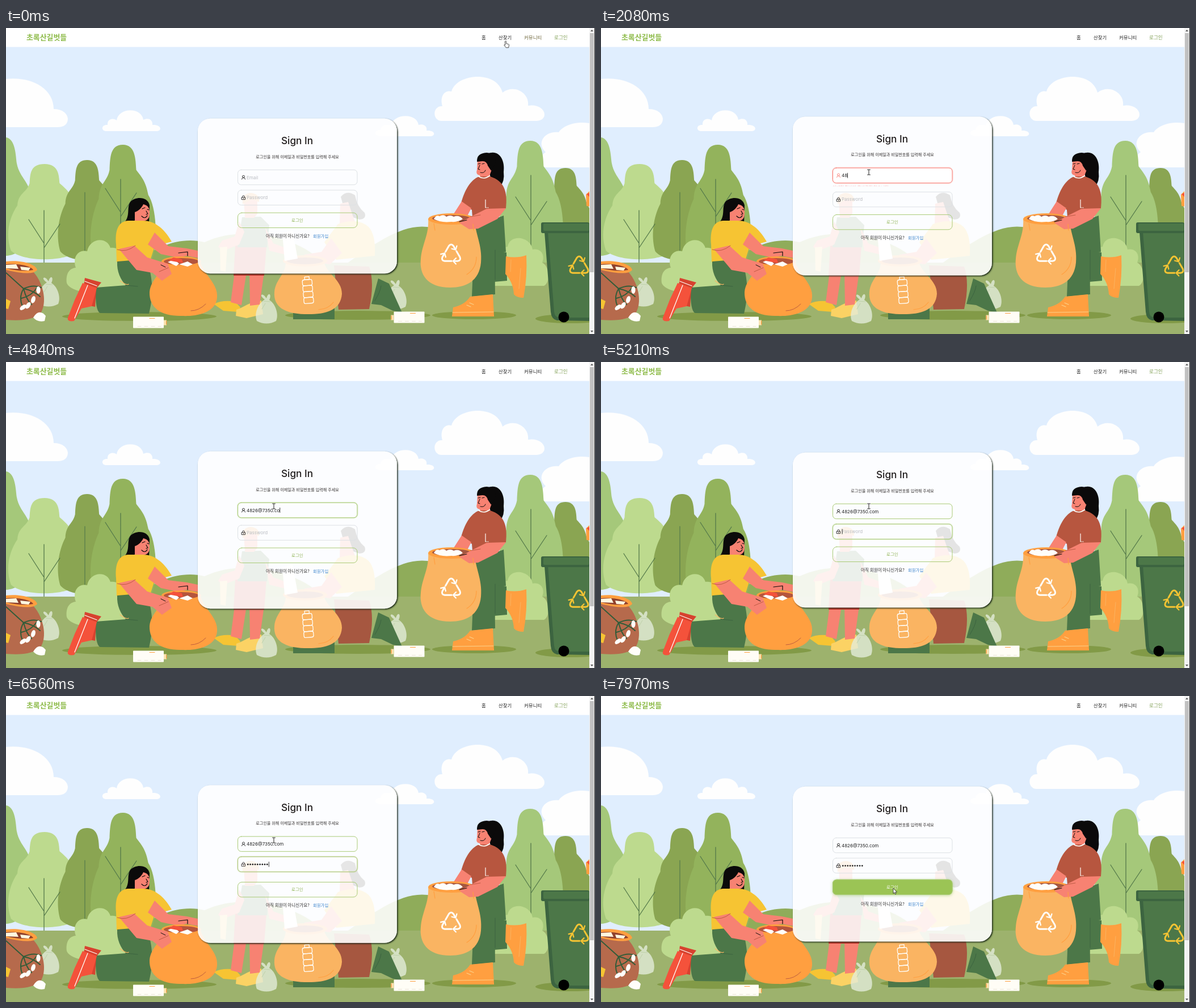
An HTML page with a canvas for the animation above (7990 ms loop, 1038 by 540 pixels).

```html
<!DOCTYPE html>
<html lang="ko">
<head>
<meta charset="utf-8">
<title>Sign In</title>
<style>
html, body { margin: 0; width: 100%; height: 100%; overflow: hidden; background: #fff; }
canvas { display: block; width: 1038px; height: 540px; }
</style>
</head>
<body>
<canvas id="stage" width="1038" height="540"></canvas>
<script>
const W = 1038, H = 540, LOOP = 7990;
const FONT = 'Inter, "Noto Sans CJK KR", "Noto Sans CJK", sans-serif';
const KR = '"Noto Sans CJK KR", "Noto Sans CJK", sans-serif';
const GREEN = '#4c7748', SHADE = '#3c6440', SKIN = '#f78272', ORANGE = '#ff9f40', PEACH = '#fab462',
      YELLOW = '#f6c433', RUST = '#b7563f', INK = '#0b0a0a', CREAM = '#fffefa';
const view = document.getElementById('stage').getContext('2d');
const scene = document.createElement('canvas');
scene.width = W; scene.height = H;
let g = scene.getContext('2d');

function fill(color, d) { g.fillStyle = color; g.fill(new Path2D(d)); }
function line(color, width, d) {
  g.strokeStyle = color; g.lineWidth = width; g.lineCap = g.lineJoin = 'round';
  g.stroke(new Path2D(d));
}
function oval(color, x, y, rx, ry = rx, turn = 0) {
  g.fillStyle = color; g.beginPath(); g.ellipse(x, y, rx, ry, turn, 0, 7); g.fill();
}
function box(x, y, w, h, r) { g.beginPath(); g.roundRect(x, y, w, h, r); }
function block(color, x, y, w, h, r = 0) { g.fillStyle = color; box(x, y, w, h, r); g.fill(); }

function tree(color, x, top, w, bottom) {
  const h = bottom - top, px = k => x + w * k, py = k => top + h * k;
  fill(color, `M${x} ${top}
    C${px(.2)} ${top} ${px(.2)} ${py(.12)} ${px(.21)} ${py(.2)} C${px(.3)} ${py(.26)} ${px(.36)} ${py(.29)} ${px(.4)} ${py(.4)}
    C${px(.53)} ${py(.5)} ${px(.55)} ${py(.76)} ${px(.47)} ${py(.9)} C${px(.3)} ${py(1.02)} ${px(-.3)} ${py(1.02)} ${px(-.47)} ${py(.9)}
    C${px(-.55)} ${py(.74)} ${px(-.5)} ${py(.56)} ${px(-.38)} ${py(.43)} C${px(-.37)} ${py(.3)} ${px(-.25)} ${py(.3)} ${px(-.21)} ${py(.2)}
    C${px(-.2)} ${py(.1)} ${px(-.2)} ${top} ${x} ${top}Z`);
}
function stem(x, top, bottom, fork) {
  line('#54794a', 1.3, `M${x} ${top}V${bottom}M${x} ${fork}L${x - 27} ${fork - 42}M${x} ${fork + 8}L${x + 28} ${fork - 34}`);
}
function recycle(x, y, color) {
  for (let i = 0; i < 3; i++) {
    g.save(); g.translate(x, y); g.rotate(i * Math.PI * 2 / 3);
    line(color, 3, 'M-10 -5L-4 -15.5Q0 -20.5 4 -15.5L6.5 -11');
    line(color, 2.2, 'M1 -10.5L8 -8.5L10 -15.5');
    g.restore();
  }
}
function tiedBag(x, y) {
  fill('rgba(229,238,219,.78)', `M${x - 3} ${y - 20}C${x - 13} ${y - 27} ${x - 9} ${y - 31} ${x - 4} ${y - 27}L${x} ${y - 22}
    C${x + 3} ${y - 34} ${x + 10} ${y - 30} ${x + 5} ${y - 19}C${x + 17} ${y - 12} ${x + 22} ${y + 8} ${x + 17} ${y + 18}
    Q${x} ${y + 27} ${x - 17} ${y + 18}C${x - 22} ${y + 4} ${x - 15} ${y - 12} ${x - 3} ${y - 20}Z`);
  line('#b9cda3', .8, `M${x - 5} ${y - 17}L${x + 7} ${y - 16}M${x - 2} ${y - 13}L${x - 8} ${y - 3}`);
}
function carton(x, y, flip) {
  block('#fffdf6', x, y, 54, 20, 1);
  block('#f9e3b0', flip ? x - 5 : x + 54, y + 6, 5, 9);
  block(ORANGE, flip ? x - 5 : x + 58, y + 7, 1.3, 7);
  line(ORANGE, 1.2, `M${x + 29} ${y + 3}h9`);
  line('#e5dfd0', .8, `M${x + 8} ${y + 17}h6m6 0h6m6 0h6m6 0h5`);
}
function bottle(x, y) {
  g.save(); g.translate(x, y); g.rotate(-.08);
  line(CREAM, 1.3, 'M-4 -24h8v5h-8z');
  for (let i = 0; i < 4; i++) {
    g.strokeStyle = CREAM; box(-8.5, -19 + i * 10.5, 17, 10.5, 3); g.stroke();
  }
  g.restore();
}

function backdrop() {
  block('#e0eefe', 0, 0, W, H);
  const cloud = '#fefefe';
  fill(cloud, 'M0 90C42 85 84 105 84 143C100 143 108 151 109 160C109 170 102 175 91 175H0Z');
  fill(cloud, 'M176 182C167 181 168 170 179 171C178 161 188 158 195 163C198 140 239 139 242 162C252 157 259 163 258 171C274 170 276 182 265 182Z');
  fill(cloud, 'M768 164C751 164 751 137 769 138C764 119 774 109 785 112C794 80 865 74 875 114C897 98 923 116 920 137C951 132 959 163 935 164Z');
  fill(cloud, 'M660 191C648 191 648 179 660 180C661 171 670 169 678 172C684 150 724 150 727 171C736 168 743 174 741 181C757 180 758 191 747 191Z');
  fill(cloud, 'M953 246C940 246 939 226 951 219C934 203 949 181 974 184C981 173 1002 164 1028 168V246Z');

  fill('#8fac5a', 'M600 416C650 380 705 340 752 353C800 366 840 390 860 416Z');
  fill('#8fac5a', 'M225 416C265 384 308 368 350 378C420 345 520 370 560 416Z');
  fill('#a5c87a', 'M0 193C17 196 17 225 19 239C24 266 45 272 44 305C60 350 40 400 0 402Z');
  tree('#bdda8e', 68, 240, 126, 410);
  tree('#8aa552', 143, 233, 101, 412);
  tree('#93b35c', 206, 206, 112, 428);
  stem(67, 322, 416, 380);
  stem(202, 267, 416, 325);
  line('#54794a', 1.2, 'M139 290V415');
  tree('#8aa552', 986, 247, 94, 405);
  tree('#a5c87a', 924, 199, 112, 425);
  stem(925, 260, 400, 340);
  block('#9db26d', 0, 414, W, 126);
  fill('#bdda8e', 'M107 450C105 433 112 424 123 423C116 402 130 390 143 394C148 370 178 368 184 388C206 386 217 408 207 423C224 431 222 455 207 460C175 472 115 470 107 450Z');
  fill('#bdda8e', 'M861 455C868 420 860 388 884 386C888 362 925 368 928 391C944 388 950 402 945 414C958 420 960 450 948 455Z');
  oval('#829a47', 235, 509, 136, 8);
  oval('#829a47', 620, 507, 128, 8);
  oval('#829a47', 825, 507, 74, 7);
  oval('#829a47', 995, 513, 62, 8);
}

function leftBag() {
  fill('#b66a4c', 'M0 424L48 430C68 453 72 486 61 503Q45 519 0 515Z');
  fill(ORANGE, 'M0 412C26 409 52 416 55 427Q47 438 0 427Z');
  fill('#8f412d', 'M0 417C22 415 44 420 48 427Q28 431 0 424Z');
  fill('#fff7df', 'M0 418L18 417L22 425L0 424ZM25 421L43 423L40 428L27 427Z');
  line('#315c39', 2, 'M0 432L31 460M31 460Q22 475 29 491M31 460Q36 480 45 488M31 460Q48 463 60 474M31 460Q48 452 62 458M27 477Q45 473 54 459');
  for (let i = 0; i < 4; i++) oval(CREAM, 30 + i * 9, 493 - i * i * 3.4, 3.6, 6.5, .9 - i * .3);
  fill(CREAM, 'M48 511Q58 494 70 508L68 517Q56 520 48 511Z');
  fill(YELLOW, 'M0 478L8 482L4 496L0 495Z');
}

function sitter() {
  fill(INK, 'M219 307C228 297 250 297 253 313L252 346L238 349Q222 352 208 344C220 331 212 318 219 307Z');
  fill(SKIN, 'M227 325C234 323 240 316 242 311C250 313 254 318 253 328C253 337 247 342 239 340L238 349L223 348L227 339Z');
  line(INK, 1.2, 'M240 319l5-2M249 320l3 1M247 323l3 5-3 1M239 332Q245 338 249 331');
  fill(YELLOW, 'M216 340C197 341 192 358 194 382L195 413L253 414L262 385L292 377C278 352 260 340 242 340Z');
  fill(SKIN, 'M262 361L286 385L319 389L338 393L340 406L318 402L302 405L273 399L250 382Z');
  line(INK, 1.2, 'M304 397L320 395L320 402');
  fill(GREEN, 'M196 412L247 408C257 432 262 465 252 504L166 503Q157 500 158 458L211 454C202 444 195 430 196 412Z');
  line(SHADE, 1, 'M211 454L232 456');
  line(PEACH, 1.1, 'M201 446Q213 455 216 452');
  fill('#d7422f', 'M139 441L168 449L159 460L157 492L132 487Z');
  fill('#f4523b', 'M135 450L160 459L151 491L133 495L120 517Q107 519 109 511L121 480Z');
  line(CREAM, 1.3, 'M144 454L121 512M139 447L160 455');
  fill(ORANGE, 'M278 412L342 411C348 435 374 451 372 475C370 506 329 509 310 508C274 509 252 494 253 466C255 443 276 433 278 412Z');
  oval(ORANGE, 309, 412, 35, 9);
  oval('#b4553d', 309, 412, 31, 6);
  fill(CREAM, 'M285 413l12-5 8 8-5 4zM305 417l15-5 9 5-9 4z');
  fill('#f4523b', 'M286 410l9-5 15 3 2 7z');
  fill(SKIN, 'M199 390L226 384L249 405L285 416L292 434L275 446L258 432L230 427Z');
  line(RUST, .9, 'M196 391Q212 397 228 384M352 487Q340 499 326 499M270 430L286 423');
  line(INK, 1, 'M273 418L281 422');
}

function pair() {
  // standing helper, mostly behind the card
  fill(YELLOW, 'M366 487Q383 479 404 483L413 493L408 501L383 499Z');
  fill('#fbd264', 'M406 497C417 494 431 482 450 481L453 505L424 512L405 508Z');
  fill(SKIN, 'M403 430H424L415 489L396 484ZM429 430H455L447 488L430 490Z');
  fill('#c93d33', 'M404 384H459L455 437H401Z');
  fill(GREEN, 'M416 334L449 333L464 348L460 387H408Z');
  fill(SKIN, 'M411 341L403 368L381 375L374 386L381 394L411 382L420 360ZM419 302H443V328L437 335H421ZM457 352L471 380L501 391L497 401L464 393Z');
  fill('#f09b45', 'M417 311Q415 292 431 291Q447 292 446 307L434 302Z');
  fill('#f6d473', 'M377 387L390 386L387 430L378 428Z');
  // seated helper with bag
  fill(INK, 'M590 298Q600 285 615 295Q619 316 632 326Q636 337 623 338L599 330Z');
  fill(SKIN, 'M589 310L603 307L610 328L617 347H588Z');
  fill(YELLOW, 'M585 346Q620 334 639 351Q652 365 650 402L582 409L561 378Z');
  fill(SKIN, 'M573 371L592 397L571 417L518 410L526 400L556 395Z');
  fill('#a65740', 'M578 419L640 421Q650 450 640 496L586 497Z');
  fill(GREEN, 'M506 496L579 486L579 514H506Z');
  fill(GREEN, 'M656 442L675 451L698 502L682 499L661 489L644 487Z');
  line(SHADE, 1, 'M650 481Q660 465 661 455');
  fill(PEACH, 'M493 413L560 412C565 434 592 444 592 469C590 501 558 506 526 505C491 504 471 492 473 466C475 443 493 435 493 413Z');
  oval(ORANGE, 527, 411, 39, 10);
  oval('#a65740', 527, 411, 32, 6);
  fill('#fff', 'M487 362L505 357L514 407L491 411Z');
  bottle(532, 463);
  line(ORANGE, 1.2, 'M577 484Q568 496 551 497');
}

function stander() {
  fill(INK, 'M848 222C868 213 880 232 877 254Q879 271 871 279Q850 275 853 248Z');
  fill(SKIN, 'M831 232L855 230L856 250L850 266H836L835 260Q827 259 830 250Z');
  fill(INK, 'M830 236Q829 221 847 220Q863 221 863 238L855 252L849 243Q847 235 840 235Z');
  line(INK, 1, 'M832 240l4-1M839 240l4-1M835 242l-3 7 3 1M836 255Q843 257 845 251');
  fill(GREEN, 'M826 350L877 331L881 395L861 399L862 470L821 474Z');
  fill(GREEN, 'M860 393L882 396L883 446L860 448Z');
  line(SHADE, 1, 'M862 392V444');
  fill(ORANGE, 'M881 403Q900 407 917 401Q919 440 912 476Q900 476 895 470Q894 449 880 434Z');
  line(PEACH, 1, 'M890 409L889 430M907 424L904 460');
  fill(ORANGE, 'M818 474L858 470L860 509H786L788 493Q808 489 818 474Z');
  line('#fbd28b', 1.2, 'M817 485l7 3M812 489l7 3M787 502L859 501');
  fill(RUST, 'M834 262C818 268 808 287 802 309L821 321L823 347L861 337L881 318C884 290 879 270 853 262Z');
  line(CREAM, 1.6, 'M833 262Q842 268 852 261');
  line(CREAM, 1.2, 'M845 303V317H850');
  fill(SKIN, 'M803 306L820 318L806 345L777 350L767 339L787 331Z');
  fill(PEACH, 'M744 337H826C826 362 840 383 837 414C834 447 810 458 783 458C742 458 728 435 731 407C733 382 746 364 744 337Z');
  oval(ORANGE, 785, 337, 41, 10);
  oval('#a65740', 785, 336, 34, 6);
  fill(CREAM, 'M754 337q4-8 10-5q8-4 12 1q7-4 13 0q9-4 16 4q-8 6-20 5q-20 2-31-5z');
  fill(SKIN, 'M847 319L881 318L866 337L832 354L816 355L799 344L819 333Z');
  line(RUST, .9, 'M848 319L847 311M818 333L836 330');
  line(INK, 1, 'M799 342L812 339');
  line(ORANGE, 1.2, 'M829 404Q829 424 812 435M754 345L756 357M823 346L824 357');
  recycle(784.5, 400, CREAM);
}

function bin() {
  fill(ORANGE, 'M1022 294L1028 288V315L1023 314Z');
  fill('#f4523b', 'M1023 293L1028 291V298Z');
  fill(SHADE, 'M949 360H1028V517L971 516Q961 514 960 501Z');
  fill(GREEN, 'M955 360H1028V511H974Q967 510 966 501Z');
  block(SHADE, 943, 343, 85, 19, 3);
  block(GREEN, 947, 345, 81, 13, 2);
  recycle(1010, 421, YELLOW);
  oval('#000', 983, 510, 9.5);
}

function chrome() {
  block('#fff', 0, 0, 1028, 33.5);
  block('#f3f3f3', 1028, 0, 9, H);
  block('#c1c1c1', 1029, 9, 7, 422);
  block('#222', 1037, 0, 1, H);
  fill('#555', 'M1030 6L1032.5 3L1035 6Z');
  fill('#555', 'M1030 534L1032.5 537L1035 534Z');
  text('초록산길벗들', 36, 21, 12.9, '#8fbc4c', { weight: 900, font: KR });
  text('홈', 838, 19.5, 8.4, '#222', { font: KR });
  text('산찾기', 868, 19.5, 8.4, '#222', { font: KR });
  text('로그인', 966, 19.5, 8.6, '#82a057', { font: KR });
}

function text(str, x, y, size, color, { weight = 400, align = 'left', font = FONT } = {}) {
  g.font = `${weight} ${size}px ${font}`;
  g.textAlign = align;
  g.fillStyle = color;
  g.fillText(str, x, y);
  return g.measureText(str).width;
}

// Timing helpers
const ramp = (t, a, b) => {
  const u = Math.min(1, Math.max(0, (t - a) / (b - a)));
  return u * u * (3 - 2 * u);
};
const pulse = (t, a, b, d) => ramp(t, a, a + d) - ramp(t, b, b + d);
const mix = (a, b, k) => `rgb(${a.map((v, i) => Math.round(v + (b[i] - v) * k))})`;
const count = (keys, t) => keys.filter(k => k <= t).length;

const GRAY = [221, 225, 228], LIME = [170, 203, 118], RED = [248, 128, 120], DARK = [40, 40, 40];
const MAIL = '4826@7350.com';
const FOCUS = 850, TAB = 5000, BLUR = 7670;
const mailKeys = [1870, 2040, 2200, 2360, 2660, 3370, 3520, 3700, 3830, 4410, 4620, 4780, 4930];
const passKeys = [5440, 5520, 5600, 5680, 5750, 6080, 6340, 6390, 6520];

function caretOn(t, start, end, keys) {
  if (t < start || t >= end) return false;
  const last = keys.filter(k => k <= t).pop() || start;
  return Math.floor((t - last) / 500) % 2 === 0;
}

function userIcon(x, y, color) {
  line(color, .9, `M${x - 2} ${y - 1.4}a2 2 0 1 0 4 0a2 2 0 1 0 -4 0M${x - 3} ${y + 3.4}q.3 -3 3 -3q2.7 0 3 3`);
}
function lockIcon(x, y, color) {
  line(color, .9, `M${x - 3} ${y - .5}h6v3.8h-6zM${x - 1.8} ${y - .5}v-1.3a1.8 1.8 0 0 1 3.6 0v1.3M${x} ${y + 1}v.8`);
}

function field(y, icon, active, focus, error) {
  const edge = error > 0 ? mix(LIME, RED, error) : mix(GRAY, LIME, active);
  if (focus > 0) {
    g.globalAlpha = focus * .28;
    g.strokeStyle = edge; g.lineWidth = 2.4;
    box(408, y - .2, 211.5, 27.4, 7); g.stroke();
  }
  g.globalAlpha = error;
  block('#fff', 408.5, y + .3, 210.5, 26.4, 6);
  g.globalAlpha = 1;
  g.strokeStyle = edge; g.lineWidth = 1;
  box(408.5, y + .3, 210.5, 26.4, 6); g.stroke();
  icon(418.5, y + 13.6, mix(DARK, RED, error));
}
function warning(str, y, open, size) {
  if (open <= 0) return;
  g.save();
  g.beginPath(); g.rect(405, y, 220, 17 * open - 3); g.clip();
  g.globalAlpha = open;
  text(str, 408, y + 10, size, '#f4504b', { font: KR });
  g.restore();
}
function caret(x, y) { block('#222', x, y, .9, 9); }

function card(t) {
  const openMail = pulse(t, 1930, 4650, 300);
  const openPass = pulse(t, 5450, 6390, 290);
  const grow = 13 * (openMail + openPass), top = 159.8 - grow / 2;

  g.save();
  const hole = new Path2D();
  hole.rect(0, 0, W, H);
  hole.roundRect(338, top, 351, 273.5 + grow, 22);
  g.clip(hole, 'evenodd');
  g.shadowColor = 'rgba(15,28,15,.95)'; g.shadowBlur = 2.5;
  g.shadowOffsetX = 1.5; g.shadowOffsetY = 1.5;
  block('#fff', 338, top, 351, 273.5 + grow, 22);
  g.restore();
  block('rgba(255,255,255,.89)', 338, top, 351, 273.5 + grow, 22);

  text('Sign In', 513, top + 45.6, 17.2, '#201c1c', { weight: 500, align: 'center' });
  text('로그인을 위해 이메일과 비밀번호를 입력해 주세요', 513.5, top + 69.8, 7.1, '#34302f', { weight: 500, align: 'center' });

  const mailY = top + 90.2;
  field(mailY, userIcon, pulse(t, 660, 7300, 230), pulse(t, FOCUS, TAB, 200), pulse(t, 1880, 4630, 200));
  const typed = MAIL.slice(0, count(mailKeys, t));
  const mailW = text(typed || 'Email', 424, mailY + 16.6, 8, typed ? '#222' : '#b9bcc0');
  if (caretOn(t, FOCUS, TAB, mailKeys)) caret(424 + (typed ? mailW : 0), mailY + 9);
  warning('이메일 형식이 올바르지 않습니다.', mailY + 27, openMail, 7.3);

  const passY = mailY + 35.8 + 13 * openMail;
  const passOn = pulse(t, TAB, BLUR, 230);
  field(passY, lockIcon, passOn, passOn, pulse(t, 5440, 6390, 200));
  const dots = count(passKeys, t);
  if (!dots) text('Password', 424, passY + 16.4, 8, '#b9bcc0');
  for (let i = 0; i < dots; i++) oval('#222', 426.3 + i * 4.25, passY + 13.8, 1.35);
  if (caretOn(t, TAB, BLUR, passKeys)) caret(424.6 + dots * 4.25, passY + 9);
  warning('비밀번호는 8~16자 영문 대 소문자, 숫자, 특수문자를 사용하세요.', passY + 27, openPass, 7.4);

  const hover = ramp(t, 7650, 7930);
  const btnY = passY + 40 + 13 * openPass - 2 * hover;
  if (hover > 0) {
    g.save();
    g.globalAlpha = hover;
    g.shadowColor = 'rgba(140,190,80,.6)'; g.shadowBlur = 5; g.shadowOffsetY = 1;
    block('#9bc455', 408, btnY, 211.5, 27, 7);
    g.restore();
  }
  g.strokeStyle = '#a9cb76'; g.lineWidth = 1;
  box(408.5, btnY + .3, 210.5, 26.4, 7); g.stroke();
  text('로그인', 513.3, btnY + 16.3, 7.4, mix([143, 179, 84], [255, 255, 255], hover), { weight: 500, align: 'center', font: KR });

  const footY = btnY + 2 * hover + 44.3;
  text('아직 회원이 아니신가요?', 458, footY, 7.6, '#2b2b2b', { font: KR });
  text('회원가입', 541, footY, 7.4, '#3c84cc', { font: KR });
}

function pointer(t) {
  const a = ramp(t, 10, 790);
  const b = 1 - Math.pow(1 - Math.min(1, Math.max(0, (t - 7160) / 640)), 1.2);
  const x = 881 - 409 * a + 43 * b, y = 25 + 229.5 * a + 85 * b;
  const overField = x < 619 && ((y > 250 && y < 277) || (y > 286 && y < 313));
  const overLink = y < 33 || (y > 325 && t < 7960);
  g.save();
  g.translate(x, y);
  if (overField || (t > 800 && t < 7160)) {
    const beam = 'M-2.5 -4.5h5M0 -4.5v9M-2.5 4.5h5';
    line('#fff', 1.8, beam);
    line('#333', 1.1, beam);
  } else {
    const shape = overLink
      ? 'M-1.5 -1.5q1 -1.2 2 0v4l4 1q1 .3 1 1.5l-.8 4.7h-4.5l-3.5 -4.5q.2 -1.5 1.8 -.2z'
      : 'M0 0V9L2 7.2L3.6 10.4L5 9.7L3.5 6.5H6.2Z';
    fill('#fff', shape);
    line('#222', .8, shape);
  }
  g.restore();
}

backdrop();
tiedBag(75, 469);
tiedBag(687, 474);
leftBag();
pair();
sitter();
stander();
tiedBag(459, 499);
carton(224, 509.5);
carton(683.5, 500.5, true);
bin();

function draw(now) {
  const t = now % LOOP;
  g = view;
  g.drawImage(scene, 0, 0);
  chrome();
  text('커뮤니티', 913, 19.5, 8.5, mix([112, 104, 62], [34, 34, 34], ramp(t, 0, 250)), { font: KR });
  card(t);
  pointer(t);
}

const start = performance.now();
function tick() {
  draw(performance.now() - start);
  requestAnimationFrame(tick);
}
tick();
</script>
</body>
</html>
```
